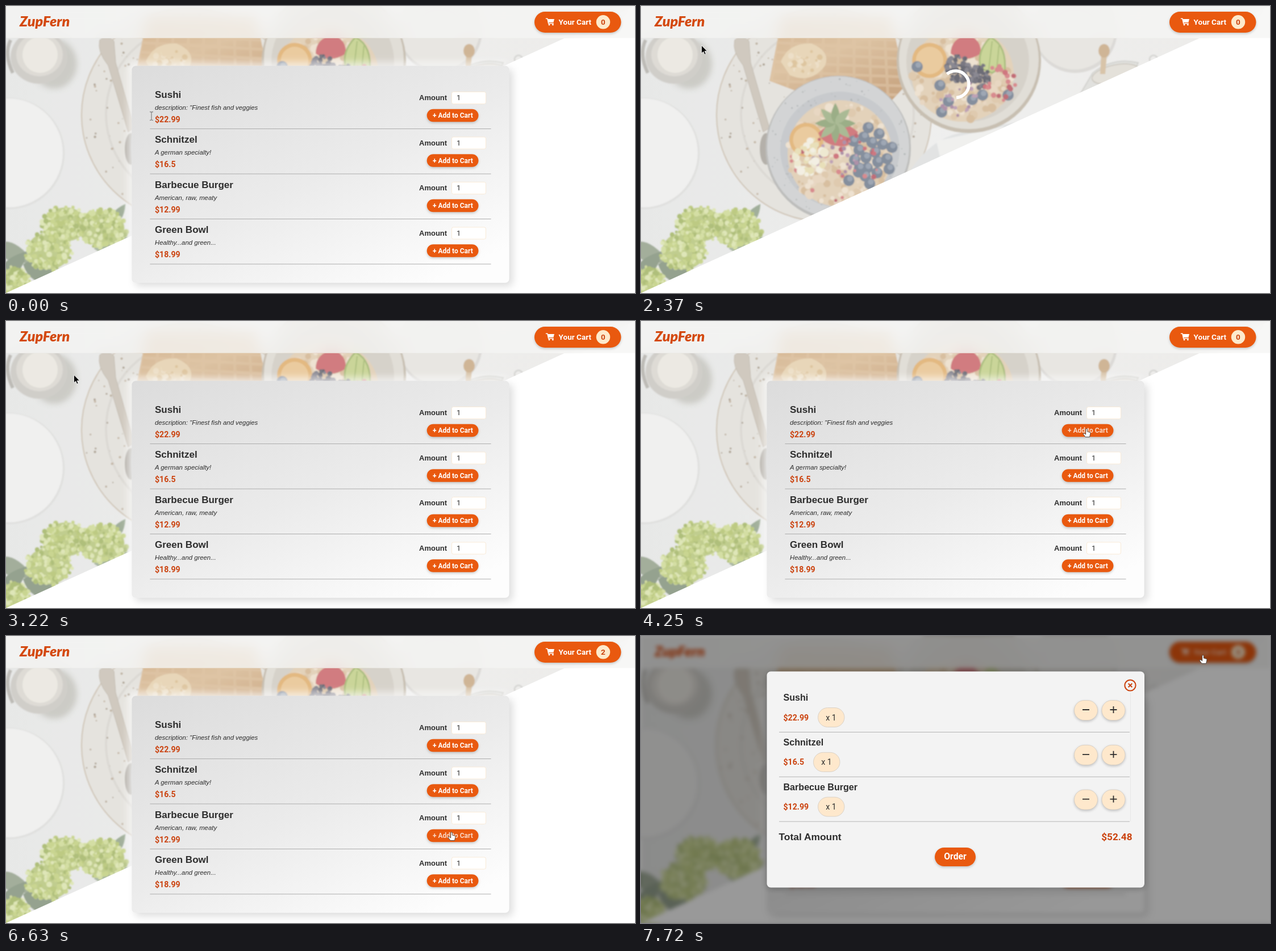
Write an HTML page that moves like this. It is 1107 px wide and 506 px high and loops after 8000 ms.

```html
<!DOCTYPE html>
<html lang="en">
<head>
<meta charset="utf-8">
<title>Food order</title>
<style>
html, body { margin: 0; width: 100%; height: 100%; overflow: hidden; background: #fff }
#stage { display: block; width: 1107px; height: 506px; font-family: "Liberation Sans", Arial, sans-serif; fill: #2d2d2d }
.b { font-weight: bold }
.price, .label, .num { font-family: Roboto, sans-serif }
.price { font-weight: bold; fill: #cb430f }
.label { font-weight: bold; fill: #fff }
.mid { text-anchor: middle }
.orange { fill: #e9590f }
.cream { fill: #fee8cc; stroke: #d3cbbf; stroke-width: .8 }
.lift { filter: drop-shadow(0 2px 2px #0003) }
.line { fill: none; stroke: #adadad }
#panel { filter: drop-shadow(6px 6px 7px #0002) drop-shadow(-5px -5px 7px #fffc) }
</style>
</head>
<body>
<svg id="stage" viewBox="0 0 1107 506"></svg>
<script>
const LOOP = 8000, RELOAD = 2090, MENU_IN = 2560, MENU_DONE = 3220, MODAL = 7720;
const $ = id => document.getElementById(id);

let seed = 7;
const rnd = () => (seed = seed * 16807 % 2147483647) / 2147483647;

const ell = (x, y, rx, ry, fill, more = '') => `<ellipse cx="${x}" cy="${y}" rx="${rx}" ry="${ry}" fill="${fill}" ${more}/>`;
const dot = (x, y, r, fill, more) => ell(x, y, r, r, fill, more);
const path = (d, fill, more = '') => `<path d="${d}" fill="${fill}" ${more}/>`;
const box = (x, y, w, h, r, more = '') => `<rect x="${x}" y="${y}" width="${w}" height="${h}" rx="${r}" ${more}/>`;
const text = (x, y, size, str, cls = '', more = '') => `<text x="${x}" y="${y}" font-size="${size}" class="${cls}" ${more}>${str}</text>`;

// Random dots inside an ellipse
function scatter(n, cx, cy, rx, ry, r0, r1, colors) {
  let out = '';
  for (let i = 0; i < n; i++) {
    const a = rnd() * 2 * Math.PI, d = Math.sqrt(rnd());
    out += dot((cx + rx * d * Math.cos(a)).toFixed(1), (cy + ry * d * Math.sin(a)).toFixed(1),
      (r0 + (r1 - r0) * rnd()).toFixed(1), colors[Math.floor(rnd() * colors.length)]);
  }
  return out;
}

const OATS = ['#e6d2b9', '#dcc3a3', '#eddfcb', '#d3b691'], REDS = ['#c9606a', '#b85460', '#d3787c'];
const LIME = ['#cfdb96', '#c2d07f', '#dbe4ad', '#b3c36e', '#a3b565'], LEAF = ['#8ba173', '#9db084'];
const leaf = (x, y, angle, size, fill) =>
  path('M0 0Q12 -16 40 0Q14 16 0 0', fill, `transform="translate(${x} ${y}) rotate(${angle}) scale(${size})"`);
const orangeSlice = (x, y, r) => dot(x, y, r, '#e0ae6c') + dot(x, y, r * .78, '#e9c490');
const berry = (x, y) => dot(x, y, 10, '#6f7b8d') + dot(x + 2, y - 3, 5, '#8e99a8');
const berries = (n, cx, cy, rx, ry) => Array.from({ length: n }, (_, i) => {
  const a = i * 2.4, d = Math.sqrt((i + .5) / n);
  return berry(cx + rx * d * Math.cos(a), cy + ry * d * Math.sin(a));
}).join('');
const WAFFLE = 'M248 20L440 20L466 140L440 168L300 160L226 132Z';

function table() {
  let waffle = '';
  for (let i = 0; i < 9; i++) waffle += `M${245 + i * 26} 20L${225 + i * 30} 165M230 ${30 + i * 17}L460 ${45 + i * 16}`;
  return [
    '<rect width="1107" height="512" fill="url(#marble)"/><g filter="url(#haze)">',
    ell(85, 102, 40, 44, '#c5c4be', 'filter="url(#soft)"'),
    ell(58, 90, 50, 47, '#cac8c2'), ell(59, 86, 41, 38, '#dad7d0'), ell(60, 86, 31, 32, '#ebe8e0'),
    path('M8 60Q-4 85 12 118', 'none', 'stroke="#b3b1ab" stroke-width="6"'),
    dot(5, 260, 98, '#dcdcda'), dot(4, 259, 96, '#f0f0ef'),
    ell(322, 192, 189, 188, '#e3e1db', 'stroke="#c8bbaa" stroke-width="2"'),
    ell(328, 190, 152, 155, 'none', 'stroke="#d8d5cf" stroke-width="4"'),
    scatter(230, 318, 192, 182, 182, .6, 2.2, ['#b3a48f', '#a19482', '#bcab97']),
    path('M165 60Q178 48 190 62L193 100L226 215L215 222L180 105Q160 80 165 60', '#cac2b6', 'stroke="#b8ada0"'),
    ell(220, 252, 11, 28, '#a9a49c'),
    path(WAFFLE, 'url(#toast)'),
    path(waffle, 'none', 'stroke="#dcbf99" stroke-width="5" opacity=".6" clip-path="url(#waffle)"'),
    path('M246 98Q260 64 300 66Q334 80 324 105Q300 138 262 122Z', '#e6d1ae'),
    scatter(45, 287, 96, 30, 24, 2, 6, ['#ecdcc0', '#dabd90', '#e6d1ae']),
    path('M474 290Q510 235 560 224L660 205L610 250L520 285Z', '#dfe1e1'),
    path('M520 238L640 212L610 235L526 266Z', '#f0f0ee'),
    dot(764, 44, 74, '#d8d6d2'), dot(763, 41, 71, '#e6e4df'),
    dot(577, 97, 127, '#c0b6a6'), dot(577, 94, 123, '#dedad2'), ell(575, 98, 108, 106, '#d1ccc3'),
    ell(566, 120, 90, 84, '#e0ccb0'), scatter(170, 564, 124, 88, 78, 3, 8, OATS),
    orangeSlice(508, 96, 31),
    path('M545 84Q545 58 575 50Q600 60 598 84Q570 102 545 84', '#cb666b'),
    path('M598 110Q590 80 615 55Q645 70 640 118L628 112L618 118Z', '#c3d088', 'stroke="#9eb46a" stroke-width="3"'),
    path('M612 112L618 62M626 112L630 70', 'none', 'stroke="#9eb46a" stroke-width="2"'),
    scatter(75, 560, 111, 23, 25, 2, 5, ['#62616c', '#52525e', '#777580']),
    scatter(60, 596, 124, 18, 22, 2, 5, ['#62616c', '#52525e', '#777580']),
    [[486, 107], [526, 140], [529, 187], [541, 168], [601, 157], [646, 157], [583, 165]].map(p => berry(...p)).join(''),
    scatter(20, 625, 138, 35, 33, 3, 5, REDS), scatter(20, 560, 160, 34, 35, 2, 4, ['#b593ab', '#a27f9a']),
    dot(347, 251, 128, '#b3b3b1'), dot(347, 249, 125, '#cdcfd0'), ell(350, 253, 105, 102, '#c0c3c6'),
    scatter(180, 347, 249, 122, 122, .5, 1.6, ['#9fa3a5', '#adafaf']),
    ell(350, 260, 92, 94, '#e0ccb0'), scatter(230, 348, 261, 90, 92, 2, 8, OATS),
    orangeSlice(291, 236, 30),
    path('M312 224Q345 190 382 222Q372 252 346 247Q320 244 312 224', '#cb666b'),
    [0, 45, 90, 135, 180, 225, 270, 315].map((a, i) => leaf(342, 207, a, .9, LEAF[i % 2])).join(''),
    berries(17, 405, 258, 42, 46), berries(4, 382, 300, 36, 18),
    scatter(30, 345, 285, 85, 68, 2, 5, REDS), scatter(28, 340, 270, 40, 40, 2, 4, ['#b593ab', '#a27f9a']),
    scatter(36, 298, 268, 27, 36, 3, 8, ['#ede7cb', '#e6dcae', '#f3efe0']),
    path('M795 118Q830 90 875 100L860 135L770 160Z', '#dededa', 'stroke="#c5c5c0" stroke-width="1.5"'),
    ell(835, 120, 42, 16, '#e2ded6', 'stroke="#c1bbb1" stroke-width="1.5" transform="rotate(-12 835 120)"'),
    path('M810 84L820 84L817 120L808 120Z', '#d3bb9b'), ell(815, 79, 10, 12, '#c9aa85'),
    dot(902, 94, 7, 'none', 'stroke="#cbcbc7" stroke-width="2"'),
    leaf(-20, 420, 25, 1.9, '#94a18b'), leaf(-10, 480, -45, 1.7, '#83937c'), leaf(185, 385, -55, 1.1, '#92a38a'),
    leaf(155, 428, -12, 1.9, '#9cac93'), leaf(30, 455, 25, 2.2, '#83937c'),
    [[105, 385, 42, 33], [168, 392, 45, 34], [75, 432, 42, 36], [14, 485, 28, 26]].map(([x, y, rx, ry]) =>
      ell(x, y, rx * .9, ry * .9, '#b7c67c') + scatter(150, x, y, rx, ry, 2, 5, LIME)).join(''),
    '</g><rect width="1107" height="512" fill="#f1f0ee" opacity=".16"/>'
  ].join('');
}

const cartIcon = path('M950.5 22.3h2.4l1.8 8.5h8.6', 'none', 'stroke="#fff" stroke-width="1.5" stroke-linecap="round"') +
  path('M953.5 23h11.5l-1.6 6h-8.8z', '#fff') + dot(956, 33, 1.4, '#fff') + dot(962.4, 33, 1.4, '#fff');

const MEALS = [['Sushi', 'description: "Finest fish and veggies', '$22.99'], ['Schnitzel', 'A german specialty!', '$16.5'],
  ['Barbecue Burger', 'American, raw, meaty', '$12.99'], ['Green Bowl', 'Healthy...and green...', '$18.99']];
const ROW = 79.5;
const menuLeft = MEALS.map(([name, about, price], i) => `<g transform="translate(0 ${i * ROW})">` +
  text(262, 161.5, 17, name, 'b') + text(262, 182.5, 11.35, about, '', 'font-style="italic"') +
  text(262, 204.5, 14.14, price, 'price') + '</g>').join('');
const menuRight = MEALS.map((m, i) => `<g transform="translate(0 ${i * ROW})">` + text(727, 166, 13, 'Amount', 'b') +
  box(784.5, 151.5, 60, 21, 3, 'fill="#fff" stroke="#f9ebd8"') + text(793, 166, 13, '1', 'num') +
  box(740.7, 181.7, 90.8, 22.6, 11.3, 'class="orange lift"') +
  text(786.3, 197, 12, '+ Add to Cart', 'label mid', `id="add${i}"`) + '</g>').join('');

const cartRows = MEALS.slice(0, 3).map(([name, , price], i) => {
  const x = price.length > 5 ? 311.5 : 303.5;
  return `<g transform="translate(0 ${i * 78.8})">` + text(250.5, 114, 16.1, name, 'b') + text(250.5, 148.5, 14.14, price, 'price') +
    box(x, 126.5, 46.5, 34, 17, 'class="cream"') + text(x + 23, 148.5, 14.14, 'x 1', 'num mid') +
    box(762.5, 113.5, 41, 35, 17.5, 'class="cream lift"') + box(811, 113.5, 41, 35, 17.5, 'class="cream lift"') +
    path('M777 130h12M825.5 130h12M831.5 124v12', 'none', 'stroke="#2d2d2d" stroke-width="1.8"') +
    path('M243 169.5H860', 'none', 'stroke="#b5b5b5"') + '</g>';
}).join('');

$('stage').innerHTML = `
<defs>
  <linearGradient id="marble"><stop stop-color="#e5e6e5"/><stop offset=".45" stop-color="#efefee"/><stop offset="1" stop-color="#ebeae8"/></linearGradient>
  <linearGradient id="toast" x2=".6" y2="1"><stop stop-color="#d0ab82"/><stop offset=".5" stop-color="#d9ba94"/><stop offset="1" stop-color="#c39a70"/></linearGradient>
  <linearGradient id="sheet" x2=".8" y2="1"><stop stop-color="#dcdcdc"/><stop offset=".55" stop-color="#ebebeb"/><stop offset="1" stop-color="#fdfdfd"/></linearGradient>
  <filter id="soft"><feGaussianBlur stdDeviation="5"/></filter>
  <filter id="haze"><feGaussianBlur stdDeviation=".9"/></filter>
  <clipPath id="waffle"><path d="${WAFFLE}"/></clipPath>
</defs>
<g id="scene">
  <g id="backdrop"><g id="photo">${table()}</g><polygon id="slope" fill="#fff"/></g>
  <svg width="1107" height="56.5"><use href="#backdrop" style="filter:blur(13px)"/><rect width="1107" height="57" fill="#f5f5f4" opacity=".78"/></svg>
  <circle id="spinner" cx="553.5" cy="138" r="23.5" fill="none" stroke="#fff" stroke-width="5.5" stroke-dasharray="88 60"/>
  <g id="menu">
    <rect id="panel" y="105.5" height="382.5" rx="7" fill="url(#sheet)"/>
    <path id="rules" class="line"/>
    <g id="left">${menuLeft}</g><g id="right">${menuRight}</g>
  </g>
  ${text(24, 36, 25, 'ZupFern', '', 'font-family="Lato, sans-serif" font-weight="900" font-style="italic" fill="#d4490f"')}
  <g id="cart">${box(930, 10, 152.5, 37, 18.5, 'class="orange lift"')}
    <g id="cartLabel">${cartIcon}${text(972.5, 32.5, 13.57, 'Your Cart', 'label')}</g>
    ${dot(1051, 28.3, 12.2, '#fdeacc')}${text(1051, 33, 13.57, '0', 'price mid', 'id="count"')}</g>
  <g id="scrollbar"><rect x="1095" width="12" height="506" fill="#f1f1f1"/><rect x="1096.5" y="12.5" width="9" height="436" fill="#b4b4b4"/>
    <path d="M1098 8l3 -4 3 4zM1098 497l3 4 3 -4z" fill="#505050"/></g>
</g>
<g id="modal">
  <rect width="1107" height="506" opacity=".4" fill="#000"/>
  ${box(221.5, 62.5, 664.5, 381, 7, 'fill="#f3f3f3" style="filter:drop-shadow(0 2px 6px #0004)"')}
  <path d="M861.5 100V327" stroke="#e6e6e6"/>
  ${cartRows}
  <g fill="none" stroke="#cb430f" stroke-width="2"><circle cx="861" cy="87" r="9.6"/><path d="M857.7 83.7l6.6 6.6m0 -6.6l-6.6 6.6"/></g>
  ${text(242.5, 360, 17.4, 'Total Amount', 'b')}${text(864.5, 360, 17.2, '$52.48', 'price', 'text-anchor="end"')}
  ${box(517, 373, 72, 33, 16.5, 'class="orange lift"')}${text(553, 394, 15.7, 'Order', 'label mid')}
</g>
<g id="pointer">
  <path id="arrow" d="M0 0V14L3.2 11L5.4 16L7.7 15L5.5 10.2H10Z" fill="#000" stroke="#fff" stroke-width=".8"/>
  <path id="hand" d="M-1.3 0.5Q0 -1 1.3 0.5V5L6.5 6.5Q7.2 7 6.8 9L5.5 14.5H-2L-6 9Q-5.5 7.2 -3.5 8.3L-1.3 10Z" fill="#fff" stroke="#444" stroke-width=".9"/>
  <path id="beam" d="M-3 -7.5Q0 -7.5 0 -6Q0 -7.5 3 -7.5M0 -6V6M-3 7.5Q0 7.5 0 6Q0 7.5 3 7.5" fill="none" stroke="#8a8a8a" stroke-width="1.3"/>
</g>`;

// time, x, y
const MOVES = [[0, 256, 194], [150, 256, 194], [720, 100, 89], [910, 100, 89], [1200, 81, -22], [RELOAD, 81, -22],
  [2370, 106.5, 69.5], [2830, 119.5, 95], [3570, 119.5, 95], [4250, 784, 190], [4800, 784, 190], [5220, 779.5, 242.5],
  [5380, 781, 255], [5680, 784, 266], [5950, 784, 266], [6390, 784, 346], [6800, 784, 346], [7400, 989, 34], [LOOP, 989, 34]];
const CLICKS = [4580, 5850, 6690];

function pointerAt(t) {
  const i = MOVES.findIndex(m => m[0] > t), [t0, x0, y0] = MOVES[i - 1], [t1, x1, y1] = MOVES[i];
  const p = (t - t0) / (t1 - t0), e = p * p * (3 - 2 * p);
  return [x0 + (x1 - x0) * e, y0 + (y1 - y0) * e];
}

function bump(age) {
  const keys = [[0, 1], [30, .95], [90, 1.04], [150, 1.05], [300, 1]];
  const i = keys.findIndex(k => k[0] > age);
  if (i < 1) return 1;
  const [a, u] = keys[i - 1], [b, v] = keys[i];
  return u + (v - u) * (age - a) / (b - a);
}

const show = (id, on) => $(id).style.display = on ? '' : 'none';
const set = (id, attrs) => { for (const k in attrs) $(id).setAttribute(k, attrs[k]); };

function draw(t) {
  const loading = t >= RELOAD && t < MENU_IN;
  const bar = t >= MENU_IN && t < 3140 ? 12 : 0;
  const width = 1107 - bar;
  const p = t < MENU_IN ? 1 : Math.min(1, (t - MENU_IN) / (MENU_DONE - MENU_IN));

  set('photo', { transform: `scale(${width / 1107})` });
  set('slope', { points: `${width},0 1107,0 1107,506 0,506` });
  show('spinner', loading);
  set('spinner', { transform: `rotate(${-130 + (t - 2370) * .36} 553.5 138)` });
  show('menu', !loading);
  set('menu', { transform: `translate(0 ${34 * (1 - p) ** 1.13})`, opacity: Math.min(1, p * 2) });
  set('panel', { x: width * .2, width: width * .6 });
  set('rules', { d: MEALS.map((m, i) => `M${width * .2 + 32} ${216.5 + i * ROW}H${width * .8 - 32}`).join('') });
  set('left', { transform: `translate(${-.2 * bar} 0)` });
  set('right', { transform: `translate(${-.8 * bar} 0)` });
  show('scrollbar', bar);

  const clicks = CLICKS.filter(c => c <= t), size = clicks.length ? bump(t - clicks.at(-1)) : 1;
  $('count').textContent = clicks.length;
  set('cart', { transform: `translate(${1006 - bar} 28.5) scale(${size}) translate(-1006 -28.5)` });

  const [x, y] = pointerAt(t);
  let hovering = false;
  MEALS.forEach((m, i) => {
    const top = 182 + i * ROW, over = !loading && x > 741 && x < 831 && y > top && y < top + 22;
    set('add' + i, { opacity: over ? .75 : 1 });
    hovering ||= over;
  });
  const overCart = x > 932 && y > 10 && y < 47;
  set('cartLabel', { opacity: t >= 7560 ? .75 : 1 });
  hovering ||= overCart;
  const beam = t < 200;
  show('hand', hovering);
  show('beam', beam);
  show('arrow', !hovering && !beam);
  set('pointer', { transform: `translate(${x} ${y})` });

  show('modal', t >= MODAL);
  $('scene').style.filter = t >= MODAL ? 'blur(3.5px)' : '';
}

function tick() {
  draw(performance.now() % LOOP);
  requestAnimationFrame(tick);
}
tick();
</script>
</body>
</html>
```
